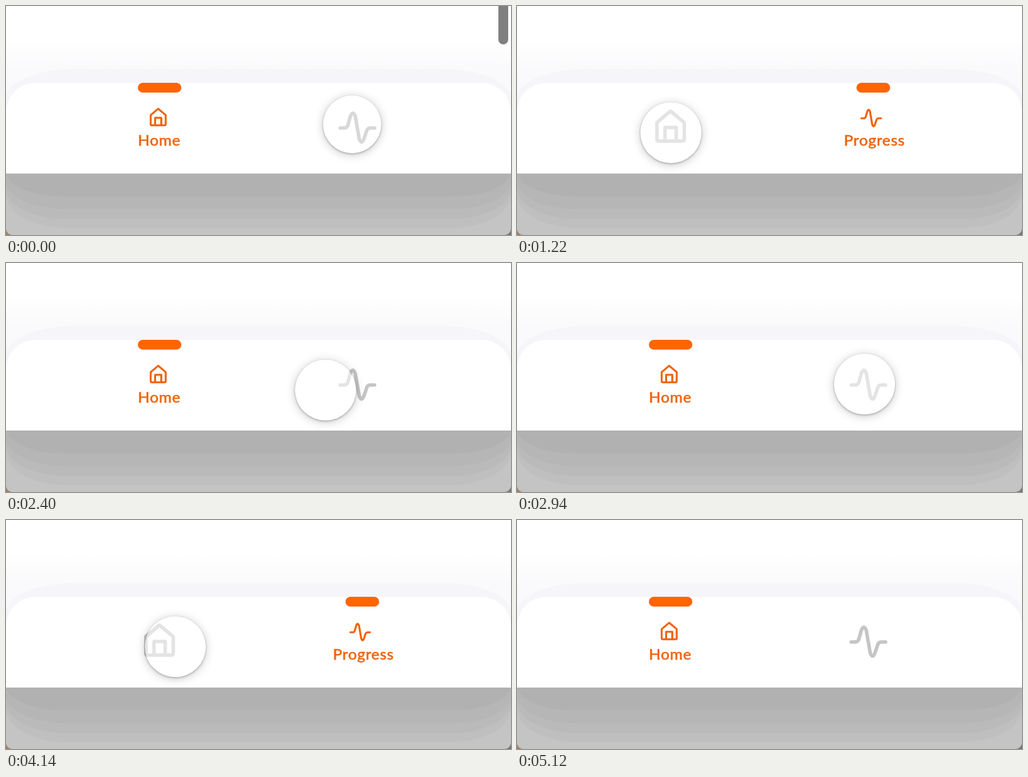
An HTML page for the animation above (5.14 s loop, 720 by 328 pixels).

```html
<!DOCTYPE html>
<html lang="en">
<head>
<meta charset="utf-8">
<title>Tab bar</title>
<style>
html, body { margin: 0; width: 100%; height: 100%; overflow: hidden; }
body { background: linear-gradient(90deg, #a5805f, #777 60%); }
#stage { position: relative; width: 720px; height: 328px; overflow: hidden; background: #c4c4c4; border-radius: 0 0 9px 9px; }
#stage div, svg { position: absolute; }
.band { left: 0; width: 720px; top: 220px; }
#page { inset: 0 0 auto; height: 240px; overflow: hidden; background: linear-gradient(#fff 45px, #fafafc 90px); }
#halo { top: 90px; width: 720px; height: 160px; background: #f5f5fa; border-radius: 100px 100px 0 0 / 42px 42px 0 0; }
#bar { top: 110px; width: 720px; height: 130px; background: #fff; border-radius: 42px 42px 0 0; }
#scroll { left: 702px; top: -20px; width: 14px; height: 75px; border-radius: 7px; background: #808080; }
#pill { top: 110px; height: 14px; border-radius: 7px; background: #ff6500; }
#touch { left: -43.5px; top: -43.5px; width: 87px; height: 87px; border-radius: 50%;
  box-shadow: 0 1px 3px rgba(0,0,0,.3), 0 2px 14px rgba(0,0,0,.22); }
#below { top: 240px; width: 720px; height: 88px; overflow: hidden; }
#glow { left: -53px; top: -293px; width: 106px; height: 106px; border-radius: 50%; background: #b99c88; }
svg { left: 0; top: 0; }
path { fill: none; stroke-width: 5; stroke-linecap: round; stroke-linejoin: round; }
text { font: 500 22px Lato, sans-serif; letter-spacing: .5px; fill: #ee620a; stroke: #ee620a; stroke-width: .35px; }
</style>
</head>
<body>
<div id="stage">
  <div id="page">
    <div id="halo"></div>
    <div id="bar"></div>
    <div id="scroll"></div>
    <div id="pill"></div>
    <svg width="720" height="240">
      <path id="house" d="M199.5 167 218.8 150.5 238.5 167V190.5Q238.5 193.5 235.5 193.5H202.5Q199.5 193.5 199.5 190.5ZM211 193V174H227V193"/>
      <path id="pulse" d="M476.5 174.8H482Q486 174.8 487.3 171L491 158Q494.5 149 498 158L503.5 190Q507 200 510.5 190L514.5 178Q515.8 174.8 519.5 174.8H525.5"/>
      <text id="home" x="188" y="200">Home</text>
      <text id="progress" x="466" y="200">Progress</text>
    </svg>
    <div id="touch"></div>
  </div>
  <div id="below"><div id="glow"></div></div>
</div>
<script>
const LOOP = 5140, DUR = 560;
const $ = id => document.getElementById(id);
const clamp = v => Math.max(0, Math.min(1, v));
const mix = (a, b, k) => a + (b - a) * k;
const ease = v => (v = clamp(v)) < .5 ? 4 * v ** 3 : 1 - 4 * (1 - v) ** 3;

// Time and selected tab: 0 home, 1 progress
const taps = [[-DUR, 0], [40, 1], [1500, 0], [3220, 1], [4560, 0]];
// Time, x, y of the touch point
const route = [
  [0, 493, 169], [600, 493, 169], [840, 372, 183], [1080, 252, 182], [1220, 219, 181],
  [1640, 219, 181], [1760, 240, 188], [1940, 307, 193], [2180, 393, 190], [2440, 466, 180],
  [2700, 494, 174], [2940, 495, 173], [3600, 495, 173], [3800, 420, 180],
  [4000, 298, 182], [4140, 241, 181], [4300, 219, 181], [LOOP, 219, 181]
];

// Soft shadow under the bar
[[318, '#bfbfbf'], [305, '#bababa'], [291, '#b6b6b6'], [273, '#b1b1b1']].forEach(([bottom, color], i) => {
  const band = document.createElement('div');
  band.className = 'band';
  band.style.cssText = `height:${bottom - 220}px;background:${color};border-radius:0 0 85px 85px / 0 0 ${48 - i * 4}px ${48 - i * 4}px`;
  $('stage').prepend(band);
});
// Widest band first, so the narrow ones lie on top
[...document.querySelectorAll('.band')].reverse().forEach(b => $('stage').insertBefore(b, $('page')));

function touchAt(t) {
  const i = route.findIndex(p => p[0] > t), a = route[i - 1], b = route[i];
  const k = (t - a[0]) / (b[0] - a[0]);
  return [mix(a[1], b[1], k), mix(a[2], b[2], k)];
}

function drawTab(icon, label, big, small, scale, on) {
  const x = mix(big[0], small[0], on), y = mix(big[1], small[1], on);
  $(icon).setAttribute('transform', `translate(${x} ${y}) scale(${mix(1, scale, on)}) translate(${-big[0]} ${-big[1]})`);
  $(icon).style.stroke = `rgb(${mix(197, 240, on)},${mix(197, 98, on)},${mix(197, 10, on)})`;
  $(label).style.opacity = clamp(on * 1.6 - .6);
  $(label).setAttribute('transform', `translate(0 ${mix(14, 0, on)})`);
}

function draw(t) {
  const [start, tab] = taps.filter(p => p[0] <= t).pop();
  const u = (t - start) / DUR;
  const lead = ease(u / .7), trail = ease(u);
  const [l, r] = tab
    ? [mix(188, 484, trail), mix(250, 532, lead)]
    : [mix(484, 188, lead), mix(532, 250, trail)];
  $('pill').style.left = l + 'px';
  $('pill').style.width = r - l + 'px';

  const k = ease(u / .8), on = tab ? k : 1 - k;
  drawTab('house', 'home', [219, 172], [217, 159], .55, 1 - on);
  drawTab('pulse', 'progress', [501, 174.5], [505, 160.7], .57, on);

  const [x, y] = touchAt(t);
  const press = taps.reduce((s, p) => s + Math.exp(-(((t - p[0]) / 60) ** 2)), 0);
  const seen = 1 - clamp((t - 4640) / 300);
  $('touch').style.transform = `translate(${x}px,${y}px) scale(${1 - .072 * press})`;
  $('touch').style.background = `rgba(255,255,255,${.55 - .35 * press})`;
  $('touch').style.opacity = seen;
  $('glow').style.transform = `translate(${x}px,${y}px)`;
  $('glow').style.opacity = seen;
  $('scroll').style.opacity = 1 - clamp((t - 150) / 200);
}

function tick() {
  draw(performance.now() % LOOP);
  requestAnimationFrame(tick);
}
tick();
</script>
</body>
</html>
```
